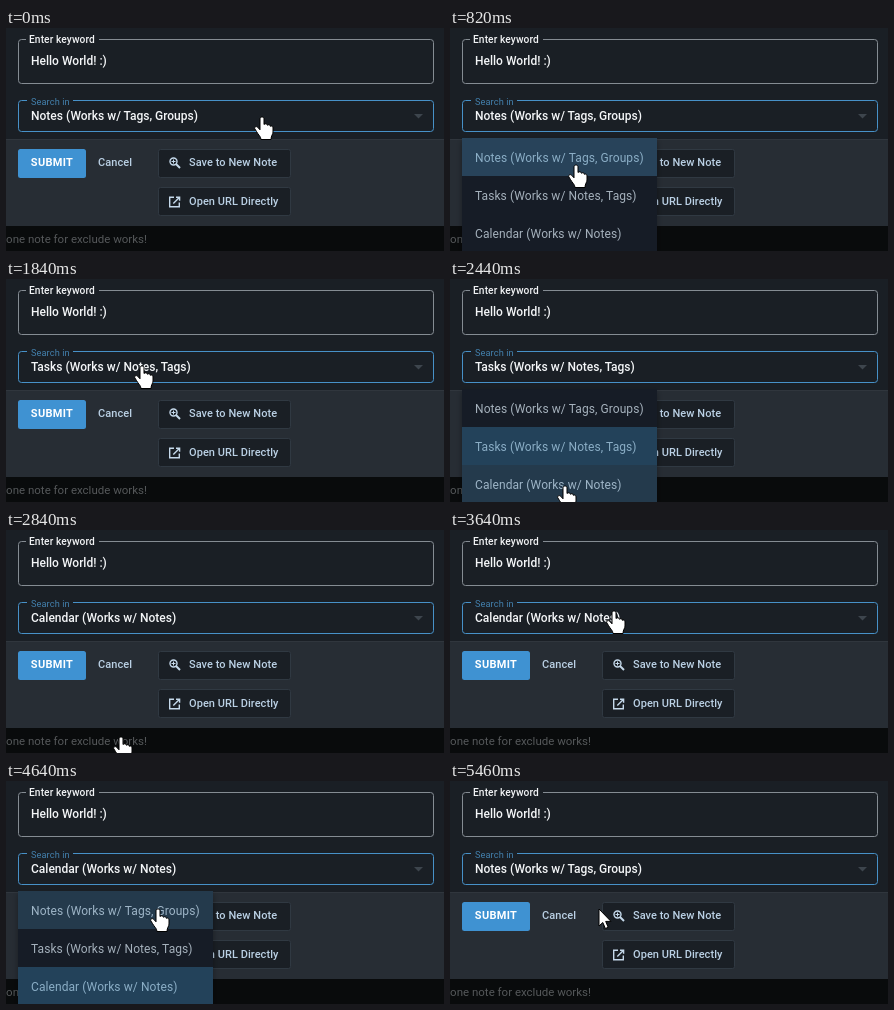
Write an HTML page that moves like this. It is 438 px wide and 223 px high and loops after 6.06 s.

```html
<!DOCTYPE html>
<html lang="en">
<head>
<meta charset="utf-8">
<title>Search form</title>
<style>
html, body { margin: 0; width: 100%; height: 100%; overflow: hidden; background: #1a1f25; }
svg { display: block; width: 438px; height: 223px; font-family: Roboto, Arial, sans-serif; }
.value { font-size: 12px; font-weight: 500; fill: #f4f6f8; }
.button { font-size: 11px; font-weight: 500; fill: #bad0e4; letter-spacing: .05px; }
.item { font-size: 12px; letter-spacing: .08px; }
.box { fill: #1a1f25; stroke: #303942; }
.icon { fill: none; stroke: #c5d9eb; stroke-width: 1.4; }
.pointer { fill: #fff; stroke: #000; stroke-linejoin: round; }
</style>
</head>
<body>
<svg viewBox="0 0 438 223" xmlns="http://www.w3.org/2000/svg">
  <defs>
    <filter id="shadow" x="-20%" y="-20%" width="140%" height="140%">
      <feDropShadow dx="0" dy="3" stdDeviation="3" flood-color="#000" flood-opacity=".35"/>
    </filter>
  </defs>
  <rect width="438" height="223" fill="#1a1f25"/>
  <rect y="111" width="438" height="87" fill="#272d34"/>
  <rect y="111" width="438" height="1" fill="#30363d"/>
  <rect y="198" width="438" height="25" fill="#090b0c"/>
  <text x="141" y="215" text-anchor="end" font-size="11.5" fill="#55585a">one note for exclude works!</text>

  <rect x="12.5" y="11.5" width="415" height="44" rx="3" fill="none" stroke="#858c93"/>
  <rect x="20" y="10" width="73" height="3" fill="#1a1f25"/>
  <text x="23" y="15" font-size="10.2" font-weight="500" letter-spacing=".1" fill="#f1f3f5">Enter keyword</text>
  <text class="value" x="25" y="37">Hello World! :)</text>

  <rect x="12.5" y="72.5" width="415" height="31" rx="3" fill="none" stroke="#4791c8"/>
  <rect x="21" y="71" width="46" height="3" fill="#1a1f25"/>
  <text x="25" y="77" font-size="9.2" letter-spacing=".1" fill="#4380ad">Search in</text>
  <text class="value" id="value" x="25" y="92"></text>
  <path d="M408 86h9l-4.500 4.500z" fill="#3d454d"/>

  <rect x="12" y="121" width="68" height="29" rx="2.500" fill="#3f92d2"/>
  <text x="46" y="138" text-anchor="middle" font-size="11" font-weight="700" letter-spacing=".3" fill="#fff">SUBMIT</text>
  <text class="button" x="92" y="138">Cancel</text>

  <rect class="box" x="152.500" y="121.500" width="132" height="28" rx="2"/>
  <g class="icon">
    <circle cx="167.500" cy="133.500" r="3.500"/>
    <path d="M170 136l4 4" stroke-width="1.900"/>
    <path d="M165.500 133.500h4M167.500 131.500v4" stroke-width="1"/>
  </g>
  <text class="button" x="183" y="138">Save to New Note</text>
  <rect class="box" x="152.500" y="159.500" width="132" height="28" rx="2"/>
  <path class="icon" d="M168 169.200h-4.300v9.600h9.600v-4.300M170 169.200h3.600v3.600M173.300 169.500l-6 6"/>
  <text class="button" x="183" y="177">Open URL Directly</text>

  <g id="menu">
    <rect x="12" y="110" width="195" height="125" fill="#191f25" filter="url(#shadow)"/>
  </g>
  <path class="pointer" id="hand" d="M-2 1.800C-2-.6 2-.6 2 1.800V7.500C3-.2+6 5.800 5.500 8.300 6.500 7.200 8.300 7.600 8.300 9.300 9.500 8.600 11 9.300 11 10.800V15C11 17.500 9 18.500 9 22.500H-1C-1 19.500-4 17.500-5.500 14.500L-7.200 11.800C-8 10-5.600 8.800-4.300 10.300L-2 12.800Z"/>
  <path class="pointer" id="arrow" d="M0 0V17L3.800 13.500 6.400 19.500 9.200 18.300 6.700 12.400H12Z"/>
</svg>
<script>
const LOOP = 6060;
const OPTIONS = ["Notes (Works w/ Tags, Groups)", "Tasks (Works w/ Notes, Tags)", "Calendar (Works w/ Notes)"];
const ROW = 38, MENU_TOP = 110;

// [start, x, y, arrow?]
const POINTER = [
  [0, 256, 89], [620, 186, 116], [820, 126, 137], [1020, 127, 157], [1220, 128, 166],
  [1640, 134, 105], [1840, 136, 87], [2240, 126, 157], [2440, 115, 207],
  [3040, 127, 158, true], [3240, 151, 92], [3440, 162, 84], [3640, 164, 81],
  [4440, 157, 114], [4640, 152, 128], [5460, 149, 128, true]
];
// [start, chosen option]
const CHOICE = [[0, 0], [1420, 1], [2840, 2], [5240, 0]];
// [start, menu opacity]
const MENU = [[0, 0], [220, 1], [1420, 0], [2040, 1], [2840, 0], [4240, 1], [5240, 0.25], [5460, 0]];

const byId = id => document.getElementById(id);
const at = (steps, t) => steps.findLast(step => step[0] <= t);

function add(tag, attrs, parent) {
  const el = document.createElementNS("http://www.w3.org/2000/svg", tag);
  for (const key in attrs) el.setAttribute(key, attrs[key]);
  return parent.appendChild(el);
}

const menu = byId("menu"), value = byId("value"), hand = byId("hand"), arrow = byId("arrow");
hand.setAttribute("d", "M-2 1.8C-2 -.6 2 -.6 2 1.8V7.500C3 6.200 5.300 6.500 5.500 8.300C6.500 7.200 8.300 7.600 8.300 9.300C9.500 8.600 11 9.300 11 10.800V15C11 17.500 9 18.500 9 22.500H-1C-1 19.500 -4 17.500 -5.500 14.500L-7.200 11.800C-8 10 -5.600 8.800 -4.300 10.300L-2 12.800Z");

const rows = OPTIONS.map((name, i) => {
  const y = MENU_TOP + i * ROW;
  const back = add("rect", { x: 12, y, width: 195, height: ROW }, menu);
  const label = add("text", { class: "item", x: 25, y: y + 24 }, menu);
  label.textContent = name;
  return { back, label };
});

function draw(t) {
  const [, x, y, isArrow] = at(POINTER, t);
  const chosen = at(CHOICE, t)[1];
  const opacity = at(MENU, t)[1];
  const hovered = Math.floor((y - MENU_TOP) / ROW);

  value.textContent = OPTIONS[chosen];
  menu.setAttribute("opacity", opacity);
  rows.forEach(({ back, label }, i) => {
    const isChosen = i === chosen, isHovered = i === hovered;
    back.setAttribute("fill", isChosen ? (isHovered ? "#28435a" : "#23425a") : isHovered ? "#243a4c" : "none");
    label.setAttribute("fill", isChosen ? "#8baec6" : isHovered ? "#9eb5c7" : "#a5b1bc");
  });

  hand.style.display = isArrow ? "none" : "";
  arrow.style.display = isArrow ? "" : "none";
  (isArrow ? arrow : hand).setAttribute("transform", `translate(${x} ${y})`);
}

const start = performance.now();
function tick() {
  draw((performance.now() - start) % LOOP);
  requestAnimationFrame(tick);
}
tick();
</script>
</body>
</html>
```
